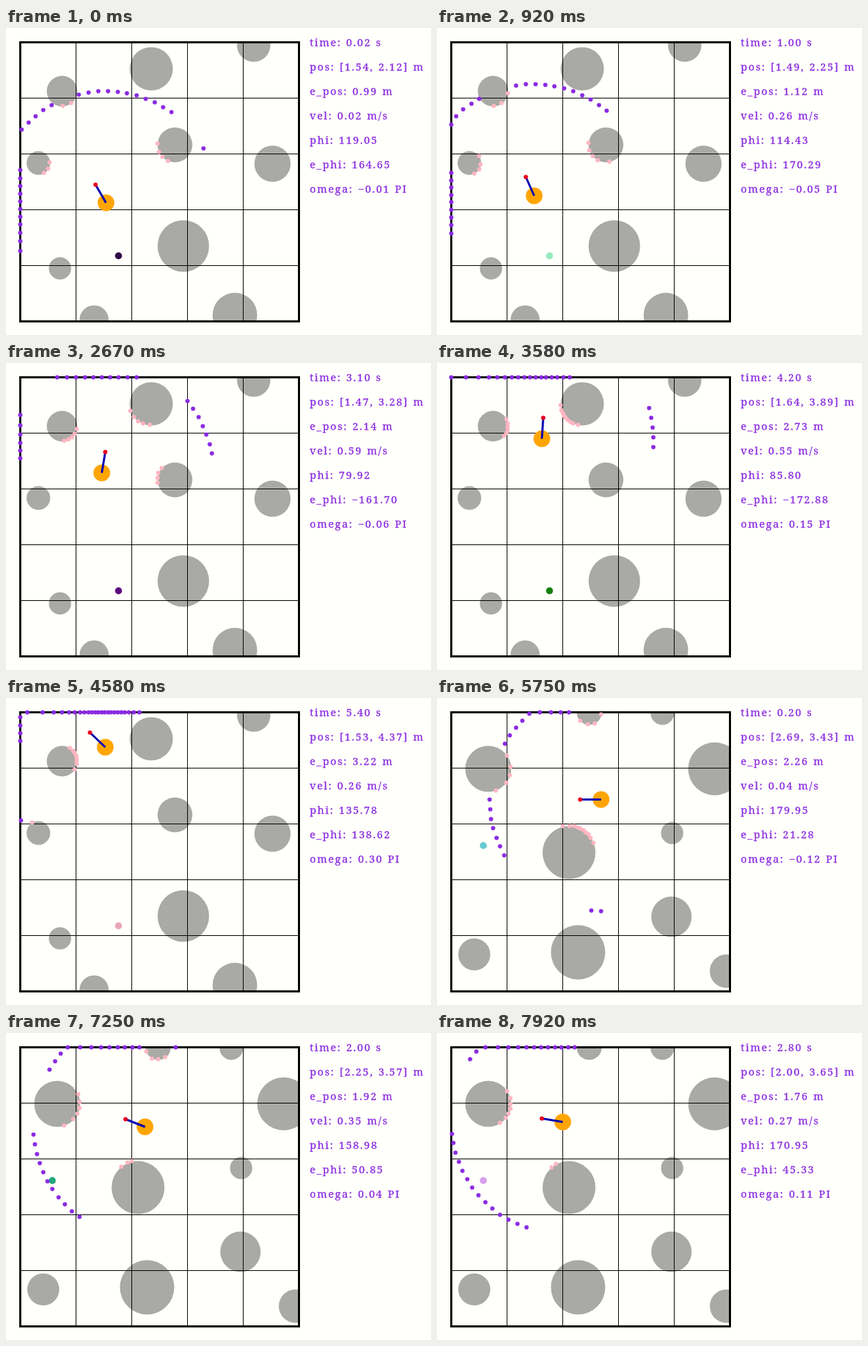
An HTML page for the animation above (8000 ms loop, 610x440 px).

```html
<!DOCTYPE html>
<html lang="en">
<head>
<meta charset="utf-8">
<title>Robot navigation with range scan</title>
<style>
  html, body { margin: 0; width: 100%; height: 100%; overflow: hidden; background: #fffffb; }
  svg { display: block; }
  text {
    font: 15px "Noto Serif", "Liberation Serif", serif;
    letter-spacing: 1.8px; word-spacing: 1px;
    fill: blueviolet; stroke: blueviolet; stroke-width: .3px;
  }
</style>
</head>
<body>
<svg id="stage" width="610" height="440" viewBox="0 0 610 440">
  <clipPath id="arena"><rect x="20" y="20" width="400" height="400"/></clipPath>
  <g transform="translate(.5 .5)">
    <g clip-path="url(#arena)" fill="#a9a9a6">
      <g id="room1">
        <circle cx="208" cy="58" r="31"/>
        <circle cx="80" cy="90" r="22"/>
        <circle cx="355" cy="24" r="24"/>
        <circle cx="242" cy="167" r="25"/>
        <circle cx="382" cy="194" r="26"/>
        <circle cx="46" cy="193" r="17"/>
        <circle cx="254" cy="312" r="37"/>
        <circle cx="77" cy="344" r="16"/>
        <circle cx="126" cy="418" r="21"/>
        <circle cx="328" cy="411" r="32"/>
      </g>
      <g id="room2">
        <circle cx="73" cy="101" r="33"/>
        <circle cx="218" cy="20" r="18"/>
        <circle cx="323" cy="21" r="17"/>
        <circle cx="398" cy="101" r="38"/>
        <circle cx="189" cy="221" r="38"/>
        <circle cx="337" cy="193" r="16"/>
        <circle cx="336" cy="313" r="29"/>
        <circle cx="202" cy="364" r="39"/>
        <circle cx="53" cy="367" r="23"/>
        <circle cx="415" cy="391" r="24"/>
      </g>
    </g>
    <path id="grid" stroke="#000" shape-rendering="crispEdges"/>
    <rect x="20" y="20" width="400" height="400" fill="none" stroke="#000" stroke-width="3"/>
    <circle id="goal" r="5"/>
    <g id="scan"></g>
    <circle id="robot" r="12" fill="orange"/>
    <line id="heading" stroke="#0000b4" stroke-width="3"/>
    <circle id="tip" r="3.1" fill="#e8001e"/>
  </g>
  <g id="readout"></g>
</svg>
<script>
const SCALE = 80, LEFT = 20, BOTTOM = 420, RANGE = 160;
const LOOP = 8000, STEPS = 96, SPLIT = 66;
const RAD = Math.PI / 180;
const $ = id => document.getElementById(id);

// Key poses in seconds, metres and degrees: v is speed, w turn rate / PI
const episodes = [
  {
    room: $('room1'), first: 1, goal: [1.774, 1.165],
    keys: [
      { t: 0.02, x: 1.5405, y: 2.1229, phi: 119.05, v: 0.02, w: -0.01 },
      { t: 2.1, x: 1.3884, y: 2.7034, phi: 98.46, v: 0.61, w: -0.12 },
      { t: 4.2, x: 1.6351, y: 3.8885, phi: 85.8, v: 0.55, w: 0.15 },
      { t: 5.4, x: 1.5271, y: 4.3735, phi: 135.78, v: 0.26, w: 0.3 }
    ]
  },
  {
    room: $('room2'), first: 67, goal: [0.583, 2.612],
    keys: [
      { t: 0.2, x: 2.6896, y: 3.4304, phi: 179.95, v: 0.04, w: -0.12 },
      { t: 1.2, x: 2.4789, y: 3.4676, phi: 162.14, v: 0.24, w: -0.1 },
      { t: 2.8, x: 2.0018, y: 3.6535, phi: 170.95, v: 0.27, w: 0.11 }
    ]
  }
];

function make(tag, parent, attrs) {
  const el = document.createElementNS('http://www.w3.org/2000/svg', tag);
  parent.append(el);
  return set(el, attrs);
}

function set(el, attrs) {
  for (const name in attrs) el.setAttribute(name, attrs[name]);
  return el;
}

const wrap = deg => deg - 360 * Math.round(deg / 360);
const toPixel = (x, y) => [LEFT + x * SCALE, BOTTOM - y * SCALE].map(Math.floor);
const place = (el, [x, y]) => set(el, { cx: Math.floor(x), cy: Math.floor(y) });

// Cubic through two values with given slopes: [value, slope]
function hermite(p, q, mp, mq, s, T) {
  const a = 2 * (p - q) + T * (mp + mq);
  const b = 3 * (q - p) - T * (2 * mp + mq);
  return [((a * s + b) * s + T * mp) * s + p, (3 * a * s * s + 2 * b * s) / T + mp];
}

// Beyond the keys the robot keeps its speed and turn rate
function coast(key, dt) {
  const turned = key.w * 180 * dt;
  const course = (key.phi + turned / 2) * RAD;
  return {
    x: key.x + key.v * dt * Math.cos(course),
    y: key.y + key.v * dt * Math.sin(course),
    phi: key.phi + turned, v: key.v, w: key.w
  };
}

function poseAt(keys, t) {
  const next = keys.findIndex(key => key.t > t + 1e-9);
  if (next < 1) {
    const key = next ? keys[keys.length - 1] : keys[0];
    return coast(key, t - key.t);
  }
  const a = keys[next - 1], b = keys[next];
  const T = b.t - a.t, s = (t - a.t) / T;
  const along = (key, trig) => key.v * trig(key.phi * RAD);
  const [x, vx] = hermite(a.x, b.x, along(a, Math.cos), along(b, Math.cos), s, T);
  const [y, vy] = hermite(a.y, b.y, along(a, Math.sin), along(b, Math.sin), s, T);
  const [phi, turn] = hermite(a.phi, b.phi, a.w * 180, b.w * 180, s, T);
  return { x, y, phi, v: Math.hypot(vx, vy), w: turn / 180 };
}

function castRay([x, y], deg, obstacles) {
  const dx = Math.cos(deg * RAD), dy = -Math.sin(deg * RAD);
  const toWall = (p, d) => Math.abs(d) < 1e-9 ? Infinity : ((d > 0 ? BOTTOM : LEFT) - p) / d;
  let d = Math.min(RANGE, toWall(x, dx), toWall(y, dy)), hit = false;
  for (const [cx, cy, r] of obstacles) {
    const along = (cx - x) * dx + (cy - y) * dy;
    const off = (cx - x) * dy - (cy - y) * dx;
    const near = along - Math.sqrt(r * r - off * off);
    if (near > 0 && near < d) { d = near; hit = true; }
  }
  return { at: [x + dx * d + 1e-6, y + dy * d + 1e-6], hit };
}

// A new random colour for every step
function goalColour(i) {
  const channel = c => {
    const v = Math.sin(i * 12.9898 + c * 78.233) * 43758.5453;
    return Math.floor((v - Math.floor(v)) * 256);
  };
  return `rgb(${channel(1)},${channel(2)},${channel(3)})`;
}

// Scene
let gridPath = '';
for (let p = 100; p < 420; p += 80) gridPath += `M${p} 20V420M20 ${p}H420`;
set($('grid'), { d: gridPath });

for (const ep of episodes) {
  ep.obstacles = [...ep.room.children].map(c => ['cx', 'cy', 'r'].map(k => +c.getAttribute(k)));
}
const dots = Array.from({ length: 37 }, () => make('circle', $('scan'), { r: 3.1 }));
const lines = Array.from({ length: 7 }, (_, n) => make('text', $('readout'), { x: 436, y: 26 + 35 * n }));

function draw(i) {
  const ep = episodes[i < SPLIT ? 0 : 1];
  const t = Math.max(0.02, (i - ep.first) / 10);
  const { x, y, phi, v, w } = poseAt(ep.keys, t);
  const [px, py] = toPixel(x, y);
  const dx = ep.goal[0] - x, dy = ep.goal[1] - y;
  const error = wrap(Math.atan2(dy, dx) / RAD - phi);

  for (const e of episodes) e.room.style.display = e === ep ? '' : 'none';
  place($('goal'), toPixel(...ep.goal));
  set($('goal'), { fill: goalColour(i) });

  dots.forEach((dot, n) => {
    const ray = castRay([px + 0.5, py + 0.5], phi - 90 + 5 * n, ep.obstacles);
    place(dot, ray.at);
    set(dot, { fill: ray.hit ? 'lightpink' : 'blueviolet' });
  });

  const x2 = Math.round(px + 30 * Math.cos(phi * RAD));
  const y2 = Math.round(py - 30 * Math.sin(phi * RAD));
  place($('robot'), [px, py]);
  place($('tip'), [x2, y2]);
  set($('heading'), { x1: px, y1: py, x2, y2 });

  const f = value => value.toFixed(2).replace('-', '\u2212');
  [
    `time: ${f(t)} s`,
    `pos: [${f(x)}, ${f(y)}] m`,
    `e_pos: ${f(Math.hypot(dx, dy))} m`,
    `vel: ${f(v)} m/s`,
    `phi: ${f(wrap(phi))}`,
    `e_phi: ${f(error)}`,
    `omega: ${f(w)} PI`
  ].forEach((line, n) => { lines[n].textContent = line; });
}

// Twelve steps a second, each starting on a whole hundredth
function stepAt(ms) {
  const i = Math.floor((ms + 4) * STEPS / LOOP);
  const begin = Math.round(i * LOOP / STEPS / 10) * 10;
  return Math.min(STEPS - 1, begin > ms ? i - 1 : i);
}

const start = performance.now();
let shown = -1;
function tick() {
  const i = stepAt((performance.now() - start) % LOOP);
  if (i !== shown) draw(shown = i);
  requestAnimationFrame(tick);
}
tick();
</script>
</body>
</html>
```
